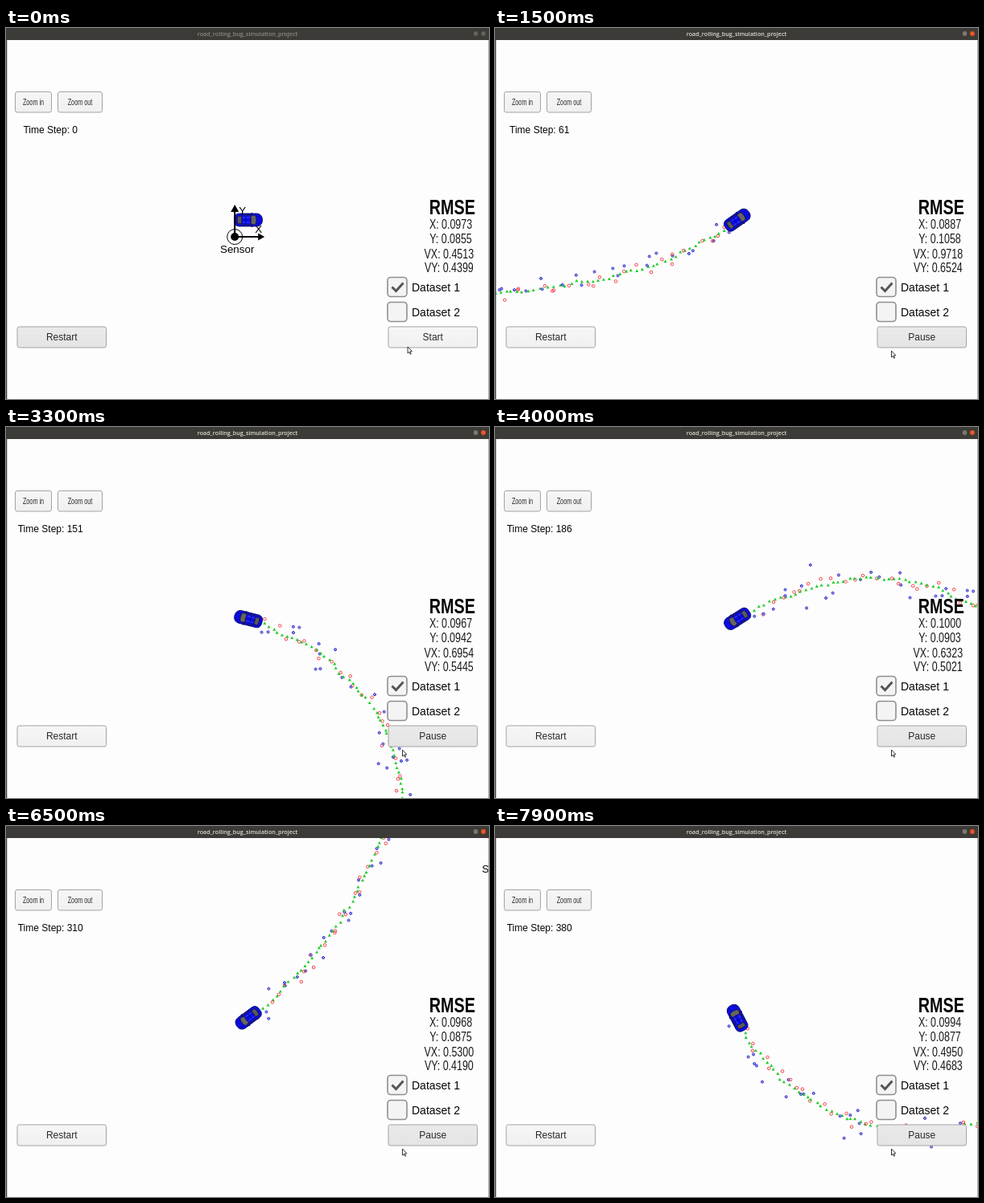
These frames come from a looping animation (600x462 px, 8 s). An HTML page with a canvas:

```html
<!DOCTYPE html>
<html lang="en">
<head>
<meta charset="utf-8">
<title>Tracking simulator</title>
<style>
html, body { margin: 0; width: 600px; height: 462px; overflow: hidden; background: #fefdfe; }
canvas { display: block; }
</style>
</head>
<body>
<canvas id="stage" width="600" height="462"></canvas>
<script>
const ctx = document.getElementById('stage').getContext('2d');
const LOOP = 8000, FRAME = 100;
const SCALE = 28;               // pixels per metre
const CAR = { x: 301, y: 239 };
const PARKED = { x: .69, y: .53 };
const SENSOR = { x: .09, y: -.15 };
const SANS = '"Liberation Sans", Arial, sans-serif';
const INK = '#050505';

// step, then RMSE of x, y, vx, vy
const RMSE = [
  [0, .0973, .0855, .4513, .4399],
  [1, .1600, .0200, 5.2000, .0000],
  [8, .0760, .0890, 2.5800, .5400],
  [25, .0820, .1120, 1.5000, .7600],
  [61, .0887, .1058, .9718, .6524],
  [111, .0929, .0987, .7676, .5930],
  [186, .1000, .0903, .6323, .5021],
  [245, .1011, .0852, .5774, .4490],
  [310, .0968, .0875, .5300, .4190],
  [380, .0994, .0877, .4950, .4683],
  [400, .0990, .0880, .4880, .4700]
];

let seed = 41;
function random() {
  seed = (seed * 16807) % 2147483647;
  return seed / 2147483647;
}
function gauss() {
  return Math.sqrt(-2 * Math.log(random())) * Math.cos(2 * Math.PI * random());
}

// Vehicle model: sinusoidal yaw rate and slightly varying speed, 20 steps per second
const phase = n => 2 * Math.PI * n / 500;
const yawAt = n => .55 * 25 / (2 * Math.PI) * (1 - Math.cos(phase(n)));
const speedAt = n => 5 + .2 * Math.cos(2 * phase(n));

const track = [];
let px = .6, py = .6, ex = 0, ey = 0;
for (let n = 0; n < 410; n++) {
  ex = .6 * ex + .045 * gauss();
  ey = .6 * ey + .045 * gauss();
  const point = { x: px, y: py, est: { x: px + ex, y: py + ey }, laser: n % 2 === 0 };
  if (point.laser) {
    point.seen = { x: px + .15 * gauss(), y: py + .15 * gauss() };
  } else {
    const r = Math.hypot(px, py) + .3 * gauss();
    const a = Math.atan2(py, px) + .03 * gauss();
    point.seen = { x: r * Math.cos(a), y: r * Math.sin(a) };
  }
  track.push(point);
  const yaw = yawAt(n + .5), d = speedAt(n + .5) * .05;
  px += d * Math.cos(yaw);
  py += d * Math.sin(yaw);
}

function positionAt(n) {
  const i = Math.floor(n), f = n - i, a = track[i], b = track[i + 1];
  return { x: a.x + (b.x - a.x) * f, y: a.y + (b.y - a.y) * f };
}

function rmseAt(n) {
  if (n === 0) return RMSE[0].slice(1);
  const i = Math.max(2, RMSE.findIndex(row => row[0] >= n));
  const a = RMSE[i - 1], b = RMSE[i], f = (n - a[0]) / (b[0] - a[0]);
  return a.slice(1).map((v, k) => v + (b[k + 1] - v) * f);
}

function text(str, x, y, size, { align = 'center', weight = '', squeeze = 1, color = INK, family = SANS } = {}) {
  ctx.save();
  ctx.translate(x, y);
  ctx.scale(squeeze, 1);
  ctx.font = `${weight} ${size}px ${family}`;
  ctx.textAlign = align;
  ctx.fillStyle = color;
  ctx.fillText(str, 0, 0);
  ctx.restore();
}

function paint(fill, stroke, width) {
  if (fill) { ctx.fillStyle = fill; ctx.fill(); }
  if (stroke) { ctx.strokeStyle = stroke; ctx.lineWidth = width; ctx.stroke(); }
}

function circle(x, y, r, fill, stroke, width = 1) {
  ctx.beginPath();
  ctx.arc(x, y, r, 0, 7);
  paint(fill, stroke, width);
}

function poly(points, fill, stroke, width = 1) {
  ctx.beginPath();
  points.forEach(([x, y]) => ctx.lineTo(x, y));
  if (fill) ctx.closePath();
  paint(fill, stroke, width);
}

function box(x, y, w, h, r, fill, stroke, width = 1) {
  ctx.beginPath();
  ctx.roundRect(x, y, w, h, r);
  paint(fill, stroke, width);
}

function drawTrail(steps, toScreen) {
  for (let n = 0; n < steps; n++) {
    const { seen, est, laser } = track[n];
    const [mx, my] = toScreen(seen);
    if (laser) {
      circle(mx, my, 1.8, null, '#ee3236', .9);
    } else {
      circle(mx, my, 1.5, '#dcdcf8', '#2020c8', 1);
      poly([[mx - .8, my - .8], [mx + .8, my + .8]], null, '#2020c8', .6);
    }
    const [gx, gy] = toScreen(est);
    poly([[gx, gy - 2], [gx + 2, gy + 1.6], [gx - 2, gy + 1.6]], '#1fcc28');
  }
}

function drawCar(yaw) {
  ctx.save();
  ctx.translate(CAR.x, CAR.y);
  ctx.rotate(-yaw);
  box(3.5, -9, 2, 18, 1, '#0a0a50');
  box(-17.5, -8, 35, 16, [6, 7, 7, 6], '#0c0ce2', '#08085c', .8);
  poly([[9.5, -4], [10, 0], [9.5, 4], [7.5, 6], [3, 4.8], [3.6, 0], [3, -4.8], [7.5, -6]], '#66665f', '#101030', .7);
  poly([[-13, -5], [-13.8, 0], [-13, 5], [-8, 4.2], [-8.5, 0], [-8, -4.2]], '#5a5a58', '#101030', .7);
  for (const s of [-1, 1]) {
    poly([[-9, 6.2 * s], [-1, 6.4 * s], [5, 6.4 * s]], null, '#1c1c48', 1.1);
    poly([[-7, 2.8 * s], [2, 3.2 * s]], null, '#3c50ff', .9);
    poly([[10.5, 5 * s], [16, 3.5 * s]], null, '#0606a4', .8);
  }
  poly([[-3, -4.5], [-3, 4.5]], null, '#060684', .9);
  ctx.restore();
}

function drawSensor(x, y) {
  circle(x, y, 9.5, null, '#000', 1);
  circle(x, y, 5, '#000');
  poly([[x, y], [x, y - 32]], null, '#000', 2);
  poly([[x, y], [x + 32, y]], null, '#000', 2);
  poly([[x, y - 40], [x + 5, y - 31], [x - 5, y - 31]], '#000');
  poly([[x + 37, y], [x + 29, y - 4.5], [x + 29, y + 4.5]], '#000');
  text('Y', x + 9.5, y - 28, 13.4);
  text('X', x + 29.5, y - 5, 13.4);
  text('Sensor', x + 3, y + 20, 13.4);
}

function button(label, x, y, w, h, pressed, size = 12, squeeze = 1) {
  const fill = ctx.createLinearGradient(0, y, 0, y + h);
  fill.addColorStop(0, pressed ? '#ebeaeb' : '#f7f6f7');
  fill.addColorStop(1, pressed ? '#e5e4e5' : '#f1f0f1');
  box(x, y, w, h, 2.5, fill, '#a3a3a3', 1);
  text(label, x + w / 2, y + h / 2 + 4, size, { squeeze, color: '#2a2a2a' });
}

function checkbox(label, y, checked) {
  box(474, y, 24, 24, 4, '#f5f4f5', '#8f8f8f', 1.6);
  if (checked) poly([[479.5, y + 12], [484.5, y + 17], [493.5, y + 7]], null, '#565656', 3);
  text(label, 504, y + 17, 14, { align: 'left' });
}

function drawHud(step) {
  const running = step > 0;
  button('Zoom in', 11.5, 79.5, 45, 25.5, false, 11, .66);
  button('Zoom out', 64.5, 79.5, 55, 25.5, false, 11, .66);
  text('Time Step: ' + step, 55.2, 131, 12);

  const squeeze = .777;
  text('RMSE', 554.3, 232, 25.4, { weight: 'bold', squeeze });
  const labels = [['X', 552.5, 249.5], ['Y', 552.5, 267.5], ['VX', 550.3, 286.5], ['VY', 550.3, 303.5]];
  rmseAt(step).forEach((v, i) => {
    const [name, x, y] = labels[i];
    text(`${name}: ${v.toFixed(4)}`, x, y, 16, { squeeze, color: '#1a1a1a' });
  });

  checkbox('Dataset 1', 310.5, true);
  checkbox('Dataset 2', 341.5, false);
  button('Restart', 14, 372, 110.5, 26, !running);
  button(running ? 'Pause' : 'Start', 475, 372, 110.5, 26, running);
}

function drawWindow(active) {
  ctx.fillStyle = '#4a4246';
  ctx.fillRect(0, 15, 1.3, 447);
  ctx.fillStyle = '#b5b2b4';
  ctx.fillRect(599, 15, 1, 447);
  ctx.fillStyle = '#3d3b37';
  ctx.fillRect(0, 0, 600, 15);
  text('road_rolling_bug_simulation_project', 300, 9.8, 7.2, {
    weight: 600, family: '"Open Sans", sans-serif', color: active ? '#dfdbd2' : '#8b8982'
  });
  circle(583.5, 7, 3.4, active ? '#7b7971' : '#64625c', '#2d2b28', .7);
  circle(593, 7, 3.4, active ? '#e8592c' : '#64625c', '#2d2b28', .7);
}

function drawPointer(t) {
  const f = Math.min(1, Math.max(0, (t - 1000) / 300));
  ctx.save();
  ctx.translate(499 - 6.5 * f, 397 + 5 * f);
  poly([[0, 0], [0, 8], [1.8, 6.4], [3, 9.2], [4.2, 8.7], [3, 5.9], [5.4, 5.7], [0, 0]], '#fff', '#222', .9);
  ctx.restore();
}

function draw(t) {
  const step = Math.max(0, Math.round(61 + (t - 1500) * .0498));
  // The car is drawn slightly ahead of the latest processed step
  const here = step ? positionAt(step + .7) : PARKED;
  const toScreen = p => [
    CAR.x + (p.x - here.x) * SCALE,
    CAR.y + 2 - (p.y - here.y) * SCALE
  ];
  ctx.fillStyle = '#fefdfe';
  ctx.fillRect(0, 0, 600, 462);
  drawTrail(step, toScreen);
  drawCar(yawAt(step));
  drawSensor(...toScreen(SENSOR));
  drawHud(step);
  drawWindow(step > 0);
  drawPointer(t);
}

function tick() {
  const t = performance.now() % LOOP;
  draw(Math.floor(t / FRAME) * FRAME);
  requestAnimationFrame(tick);
}
tick();
</script>
</body>
</html>
```
